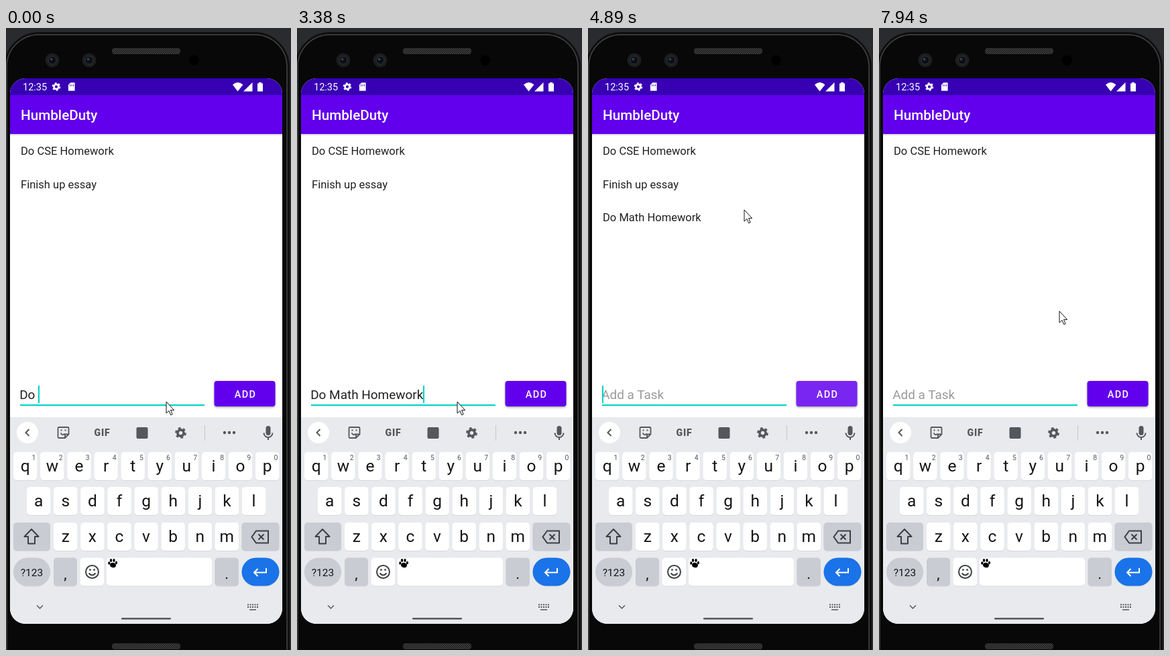
An HTML page that plays this animation: 425 by 927 pixels, repeating every 8000 ms.

```html
<!DOCTYPE html>
<html lang="en">
<head>
<meta charset="utf-8">
<title>To-do list</title>
<style>
  html, body { margin: 0; width: 100%; height: 100%; overflow: hidden; background: #2a2b2e; }
  svg { display: block; width: 425px; height: 927px; }
  text { font-family: Roboto, sans-serif; white-space: pre; }
  .line { fill: none; stroke: #54575b; stroke-width: 2; }
  .item { font-size: 16.54px; fill: #202020; }
  .field { font-size: 18.95px; fill: #202020; }
  .mid { text-anchor: middle; }
</style>
</head>
<body>
<svg viewBox="0 0 425 927">
  <defs>
    <clipPath id="screen"><rect x="6" y="75" width="406" height="813" rx="23"/></clipPath>
    <clipPath id="buttonClip"><rect x="310.5" y="526" width="91" height="38" rx="4"/></clipPath>
    <radialGradient id="glow">
      <stop offset=".25" stop-color="#fff"/>
      <stop offset="1" stop-color="#fff" stop-opacity="0"/>
    </radialGradient>
    <pattern id="mesh" width="3" height="3" patternUnits="userSpaceOnUse">
      <rect width="3" height="3" fill="#202020"/>
      <path d="M0 3L3 0" stroke="#4c4c4c"/>
    </pattern>
    <filter id="blur" x="-20%" y="-40%" width="140%" height="180%"><feGaussianBlur stdDeviation="1.6"/></filter>
    <g id="gear" fill="none" stroke="currentColor">
      <circle r="4.6" stroke-width="3.6"/>
      <circle r="7" stroke-width="2.8" pathLength="12" stroke-dasharray="1 1"/>
    </g>
    <g id="lens">
      <circle r="10.5" fill="#1b1d20"/>
      <circle r="6" fill="#0c0f13" stroke="#30343a"/>
      <circle cx="-1.5" cy="-1.5" r="2" fill="#34404a"/>
    </g>
  </defs>

  <!-- phone body -->
  <rect x="-.5" y="8.5" width="421" height="990" rx="50" fill="#080808" stroke="#0f0f0f" stroke-width="5"/>
  <rect x="1" y="10" width="418" height="990" rx="48" fill="#080808" stroke="#444546" stroke-width="1.5"/>
  <rect x="158" y="30" width="102" height="9" rx="4" fill="url(#mesh)"/>
  <rect x="158" y="917" width="102" height="9" rx="4" fill="url(#mesh)"/>
  <use href="#lens" x="69" y="48"/>
  <use href="#lens" x="124" y="48"/>
  <circle cx="280.500" cy="48" r="7.500" fill="#000"/>

  <g clip-path="url(#screen)">
    <rect x="6" y="75" width="406" height="813" fill="#fff"/>
    <rect x="6" y="158" width="406" height="2" opacity=".12"/>
    <rect x="6" y="75" width="406" height="25" fill="#3700b3"/>
    <rect x="6" y="100" width="406" height="58" fill="#6200ee"/>

    <!-- status bar -->
    <g fill="#fff" color="#fff">
      <text x="25" y="93" font-size="14.5">12:35</text>
      <use href="#gear" transform="translate(75 87.500) scale(.75)"/>
      <path d="M96 81h7v13H92.500V85zM95.500 84v3M98 84v3M100.500 84v3" stroke="#3700b3" stroke-width=".8"/>
      <path d="M338 84.500Q345.500 77.500 353.500 84.500L345.500 94.500z"/>
      <path d="M367.500 81V94.500H354z"/>
      <path d="M377 81h4v1.500h2V94.500h-8V82.500h2z"/>
    </g>
    <text x="22" y="137" font-size="20.7" font-weight="500" fill="#fff">HumbleDuty</text>

    <!-- tasks -->
    <text class="item" x="22" y="189">Do CSE Homework</text>
    <text class="item" x="22" y="238.600" id="essay">Finish up essay</text>
    <text class="item" x="22" id="math">Do Math Homework</text>

    <!-- entry row -->
    <rect x="21" y="561" width="275" height="2.200" fill="#03d3c3"/>
    <text class="field" x="20.200" y="553.300" id="field"></text>
    <rect id="caret" y="533" width="2" height="26" fill="#03d3c3"/>
    <rect id="shadow" x="310.5" width="91" height="38" rx="4" filter="url(#blur)"/>
    <g clip-path="url(#buttonClip)">
      <rect x="310" y="526" width="92" height="38" fill="#6200ee"/>
      <circle id="ripple" cx="339" cy="545" fill="url(#glow)"/>
      <rect id="tint" x="310" y="526" width="92" height="38" fill="#fff"/>
    </g>
    <text class="mid" x="357" y="551" font-size="14.5" font-weight="500" letter-spacing="1.3" fill="#fff">ADD</text>

    <!-- keyboard -->
    <rect x="6" y="580" width="406" height="308" fill="#e8eaed"/>
    <g id="keys"></g>
    <circle cx="32" cy="603" r="16" fill="#fff"/>
    <g class="line">
      <path d="M34.500 598L29.500 603L34.500 608"/>
      <path d="M79 595h13a1.500 1.500 0 0 1 1.500 1.500v9l-5.500 5.500h-9a1.500 1.500 0 0 1-1.500-1.500V596.500A1.500 1.500 0 0 1 79 595zM88 611v-5.500h5.500M81.500 603.500q3 5 6 1" stroke-width="1.8"/>
      <path d="M81.500 599.500h2M87.500 599.500h2"/>
      <path d="M296.500 592V615" stroke="#c5c8cc" stroke-width="1"/>
      <path d="M384.500 603.500a6.500 6.500 0 0 0 13 0M391 610v4"/>
      <path d="M46 860.500L50.500 865L55 860.500" stroke-width="1.5"/>
      <path d="M360 859.500h16M360 863h16" stroke-dasharray="2 1.5"/>
      <path d="M363 867h10" stroke-width="1.5"/>
    </g>
    <g fill="#54575b" color="#54575b">
      <text class="mid" x="143.500" y="608" font-size="14" font-weight="900" letter-spacing=".8">GIF</text>
      <rect x="194.500" y="595" width="17" height="17" rx="2"/>
      <use href="#gear" x="260.500" y="603.500"/>
      <circle cx="326" cy="603" r="2.200"/><circle cx="333" cy="603" r="2.200"/><circle cx="340" cy="603" r="2.200"/>
      <rect x="387.500" y="593" width="7" height="14" rx="3.500"/>
      <rect x="172" y="879" width="74" height="2.500" rx="1.200"/>
    </g>
    <g class="line" style="stroke:#3c4043">
      <path d="M38 747L27.500 758H33V768.500H43V758H48.500z" stroke-linejoin="round"/>
      <path d="M373 749.500H391V767.500H373L366.500 758.500zM376.500 754.500l8 8M384.500 754.500l-8 8"/>
      <circle cx="128.500" cy="810.500" r="9.500"/>
      <path d="M123.500 812.500q5 6 10 0"/>
      <path d="M124.200 807.500h2.500M130.300 807.500h2.500" stroke-width="2.500"/>
      <path d="M388 805V811.500H370.500M375.500 806L370 811.500L375.500 817" stroke="#fff"/>
    </g>
    <g>
      <ellipse cx="159.500" cy="800.500" rx="4.500" ry="3.600" transform="rotate(15 159.500 800.500)"/>
      <ellipse cx="153.800" cy="797.500" rx="1.600" ry="2.200"/><ellipse cx="156.500" cy="793.500" rx="1.700" ry="2.400"/>
      <ellipse cx="161" cy="793.500" rx="1.700" ry="2.400"/><ellipse cx="164.500" cy="797" rx="1.600" ry="2.200"/>
    </g>
  </g>

  <path id="mouse" d="M0 0V17.200L4 13.500L6.700 19.800L9.200 18.700L6.500 12.600H11.700z" fill="#fff" stroke="#111"/>
</svg>

<script>
const $ = id => document.getElementById(id);
const set = (id, attrs) => Object.entries(attrs).forEach(([k, v]) => $(id).setAttribute(k, v));

// Keyboard
let markup = '';
function key(x, y, w, label = '', { fill = '#fff', rx = 5, size = 24.5, dy = 29 } = {}) {
  markup += `<rect x="${x}" y="${y + 1}" width="${w}" height="42" rx="${rx}" fill="#d5d7db"/>
    <rect x="${x}" y="${y}" width="${w}" height="42" rx="${rx}" fill="${fill}"/>
    <text class="mid" x="${x + w / 2}" y="${y + dy}" font-size="${size}" fill="#151515">${label}</text>`;
}
const PITCH = 40.1, GREY = '#c9ccd3';
[['qwertyuiop', 11, 632], ['asdfghjkl', 31, 684], ['zxcvbnm', 71, 737]].forEach(([letters, x, y]) =>
  [...letters].forEach((c, i) => key(x + i * PITCH, y, 35.5, c)));
for (let i = 0; i < 10; i++)
  markup += `<text class="mid" x="${41.5 + i * PITCH}" y="644" font-size="10.5" fill="#55585c">${(i + 1) % 10}</text>`;
key(11, 737, 55, '', { fill: GREY });
key(351.5, 737, 56, '', { fill: GREY });
key(11, 789.5, 55, '?123', { fill: GREY, rx: 21, size: 15.5, dy: 27 });
key(71, 789.5, 35, ',', { fill: GREY, size: 22, dy: 31 });
key(110.5, 789.5, 35.5);
key(150, 789.5, 157);
key(311.5, 789.5, 35.5, '.', { fill: GREY, size: 22, dy: 31 });
key(351.5, 789.5, 56, '', { fill: '#1a73e8', rx: 21 });
$('keys').innerHTML = markup;

// Timeline: each entry holds until the next one
const LOOP = 8000, CLEARED = 4470;
const typed = [370, 640, 820, 1010, 1440, 1810, 2120, 2400, 2520, 2800, 2950, 3230, 3380];
const mouse = [[0, 239, 557], [3810, 264, 553], [3945, 306, 546], [4080, 330, 541], [4215, 335, 540],
  [4890, 233, 271], [5010, 207, 250], [5150, 181, 234], [5280, 162, 227], [5420, 151, 231],
  [5550, 147, 236], [7790, 205, 322], [7940, 269, 422]];
const caret = [[0, 1], [3945, 0], [4350, 1], [5010, 0], [5420, 1], [5920, 0], [6470, 1], [7000, 0], [7390, 1], [7940, 0]];
// radius, glow, tint, elevation
const press = [[0, 0, 0, 0, 0], [4350, 18, .2, 0, .5], [4470, 34, .24, .02, 1], [4620, 90, .2, .08, 1],
  [4890, 0, 0, .15, 0], [5010, 0, 0, .07, 0], [5150, 0, 0, 0, 0]];
const essay = [[0, 1], [6200, .4], [6335, 0]];
const math = [[0, 0, 288.3], [4620, 1, 288.3], [6335, 1, 264], [6470, 1, 238.6], [7270, .4, 238.6], [7390, 0, 238.6]];
const at = (track, t) => track.findLast(step => step[0] <= t).slice(1);

function draw(t) {
  const cleared = t >= CLEARED;
  const count = typed.filter(time => time <= t).length;
  const text = 'Do Math Homework'.slice(0, 3 + count);
  $('field').textContent = cleared ? 'Add a Task' : text;
  $('field').style.fill = cleared ? '#9a9a9a' : '#202020';
  set('caret', { x: cleared ? 21 : Math.floor(20.2 + $('field').getComputedTextLength()), opacity: at(caret, t)[0] });

  const [r, glow, tint, lift] = at(press, t);
  set('ripple', { r, opacity: glow });
  set('tint', { opacity: tint });
  set('shadow', { y: 527.5 + lift * 3, opacity: .35 + lift * .1 });

  const [mathOpacity, mathY] = at(math, t);
  set('essay', { opacity: at(essay, t)[0] });
  set('math', { opacity: mathOpacity, y: mathY });
  set('mouse', { transform: `translate(${at(mouse, t)})` });
}

const start = performance.now();
function tick() {
  draw((performance.now() - start) % LOOP);
  requestAnimationFrame(tick);
}
tick();
</script>
</body>
</html>
```
